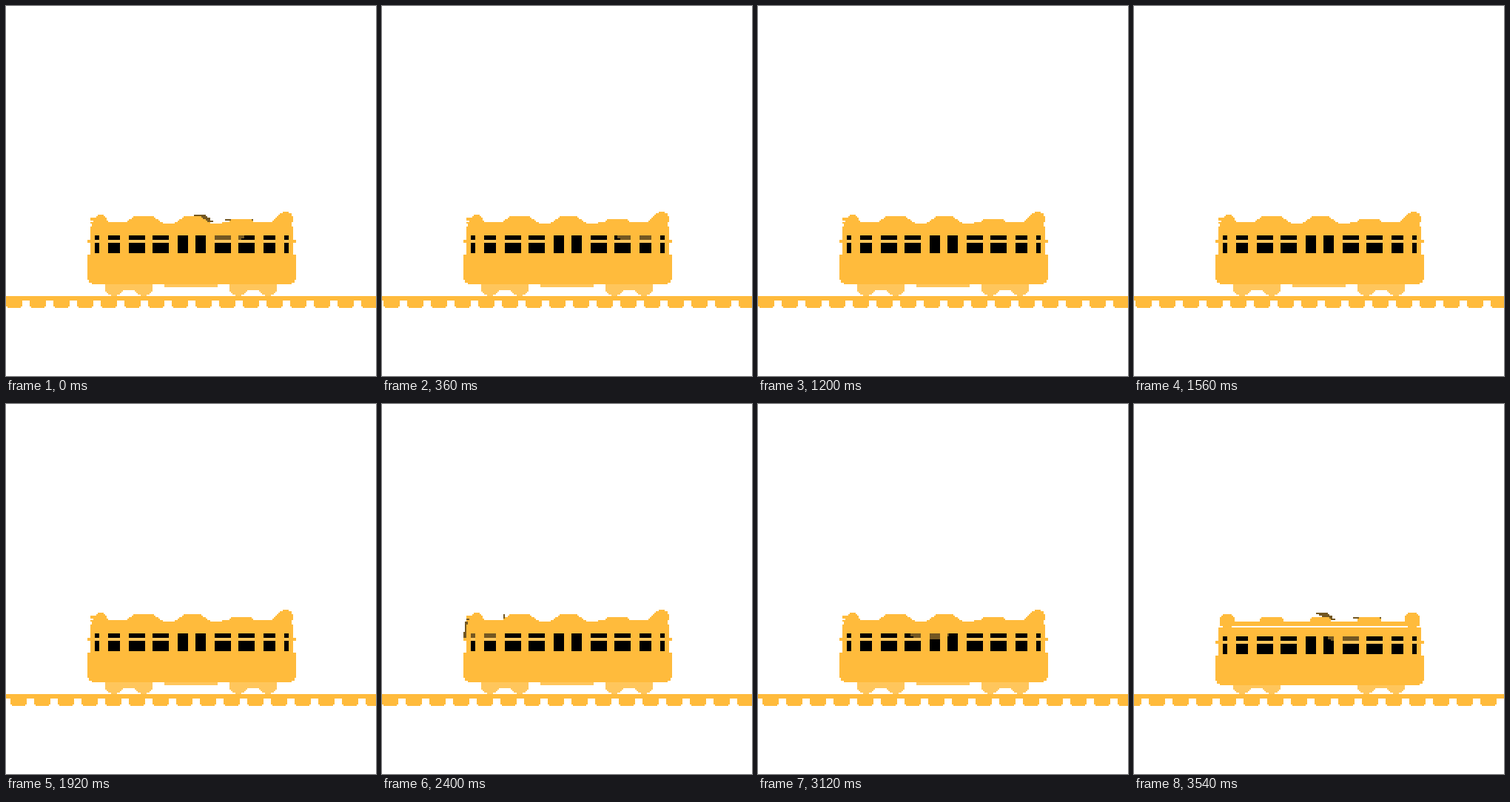
An HTML page with a canvas for the animation above (3600 ms loop, 500 by 500 pixels).

```html
<!DOCTYPE html>
<html lang="en">
<head>
<meta charset="utf-8">
<title>Tram</title>
<style>
  html, body { margin: 0; width: 100%; height: 100%; overflow: hidden; background: #fff; }
  canvas { display: block; width: 500px; height: 500px; image-rendering: pixelated; }
</style>
</head>
<body>
<canvas id="stage" width="250" height="250"></canvas>
<script>
const ctx = document.getElementById('stage').getContext('2d');
const STEP = 60, COUNT = 60;
const YELLOW = '#ffbb3c', LIGHT = '#ffc65c', SHADE = '#735722', BLACK = '#000';

// Left edge and width; the right half mirrors the left, doors in the middle.
const DOOR = [116, 7];
const WINDOWS = [[60, 3], [69, 8], [83, 11], [99, 11]];
const bothSides = ([x, w]) => [[x, w], [251 - x - w, w]];

function box(x, y, w, h) { ctx.fillRect(x, y, w, h); }

function disc(cx, cy, r) {
  for (let y = Math.ceil(cy - r); y < cy + r; y++) {
    const d = y + 0.5 - cy;
    const half = Math.round(Math.sqrt(Math.max(0, r * r - d * d)));
    box(Math.round(cx) - half, y, half * 2, 1);
  }
}

// A roof box whose sides flare out row by row.
function hump(x, y, w, flare) {
  for (let i = 0; y + i < 149; i++) {
    const out = Math.round(i * flare);
    box(x - out, y + i, w + out * 2, 1);
  }
}

// A panel with round lower corners.
function panel(x, y, w, h, r) {
  box(x, y, w, h - r);
  for (let i = 0; i < r; i++) {
    const inset = r - Math.round(Math.sqrt(r * r - (i + 0.5) ** 2));
    box(x + inset, y + h - r + i, w - inset * 2, 1);
  }
}

function track(n) {
  ctx.fillStyle = YELLOW;
  box(0, 196, 250, 3);
  const shift = Math.floor(n * 5.6 + 1e-6) % 16;
  for (let x = shift - 16; x < 250; x += 16) {
    box(x, 199, 11, 4);
    box(x + 1, 203, 9, 1);
  }
}

function undercarriage() {
  ctx.fillStyle = LIGHT;
  for (const x of [73, 157]) {
    disc(x, 189.5, 6.4);
    disc(x + 20, 189.5, 6.4);
    box(x - 6, 187, 32, 5);
  }
  box(107, 187, 36, 3);
}

function roof(up) {
  const top = up ? 142 : 144, flare = up ? 1.4 : 0.5;
  hump(86, top, 14, flare);
  hump(120, top, 12, flare);
  hump(152, 144, 14, flare);
  box(58, 147, 135, 3);
  if (up) {
    box(57, 146, 28, 1);
    box(146, 146, 47, 1);
    box(57, 143, 10, 2);
    disc(64, 145.5, 4.5);
    disc(188.5, 144, 5);
    for (let i = 0; i < 5; i++) box(184 - i, 141 + i, 6, 1);
  } else {
    disc(62.5, 146.5, 5);
    disc(188, 146, 5.5);
  }
}

function shadowOnRoof(x) {
  ctx.fillStyle = SHADE;
  if (x > 130 && x < 155) {
    for (let i = 0; i < 5; i++) box(x - 20 + Math.round(i * 1.8), 141 + i, 8 - Math.ceil(i / 2), 1);
    box(148, 144, 19, 1);
  } else if (x > 54 && x < 80) {
    for (let i = 0; i < 15; i++) box(x - 10 - Math.round(i / 7), 143 + i, 3, 1);
    box(x + 15, 142, 1, 3);
  }
}

function glass(x, dy) {
  const windows = WINDOWS.flatMap(bothSides);
  const panes = [...windows, ...bothSides(DOOR)].map(([l, w]) => [l, 155 + dy, w, 12]);
  ctx.fillStyle = BLACK;
  panes.forEach(p => box(...p));

  ctx.save();
  ctx.beginPath();
  panes.forEach(p => ctx.rect(...p));
  ctx.clip();
  ctx.fillStyle = SHADE;
  for (let i = 0; i < 4; i++) {
    const half = Math.round(13 * Math.sqrt(1 - i * i / 16));
    box(x + 1 - half, 155 + dy + i, half * 2, 1);
  }
  ctx.restore();

  ctx.fillStyle = LIGHT;
  windows.forEach(([l, w]) => box(l, 158 + dy, w, 2));
}

function draw(n) {
  const up = n % 2 === 0, dy = up ? 0 : 2;
  const t = n < 20 ? n + COUNT : n;
  const x = 67 + 4 * (t - 40);
  ctx.fillStyle = '#fff';
  box(0, 0, 250, 250);
  track(n);
  shadowOnRoof(x);
  undercarriage();
  ctx.fillStyle = YELLOW;
  roof(up);
  box(57, 149 + dy, 137, 19);
  box(55, 158 + dy, 141, 2);
  panel(55, 168 + dy, 141, 20, 5);
  glass(x, dy);
}

function tick() {
  draw(Math.floor(performance.now() / STEP) % COUNT);
  requestAnimationFrame(tick);
}
tick();
</script>
</body>
</html>
```
